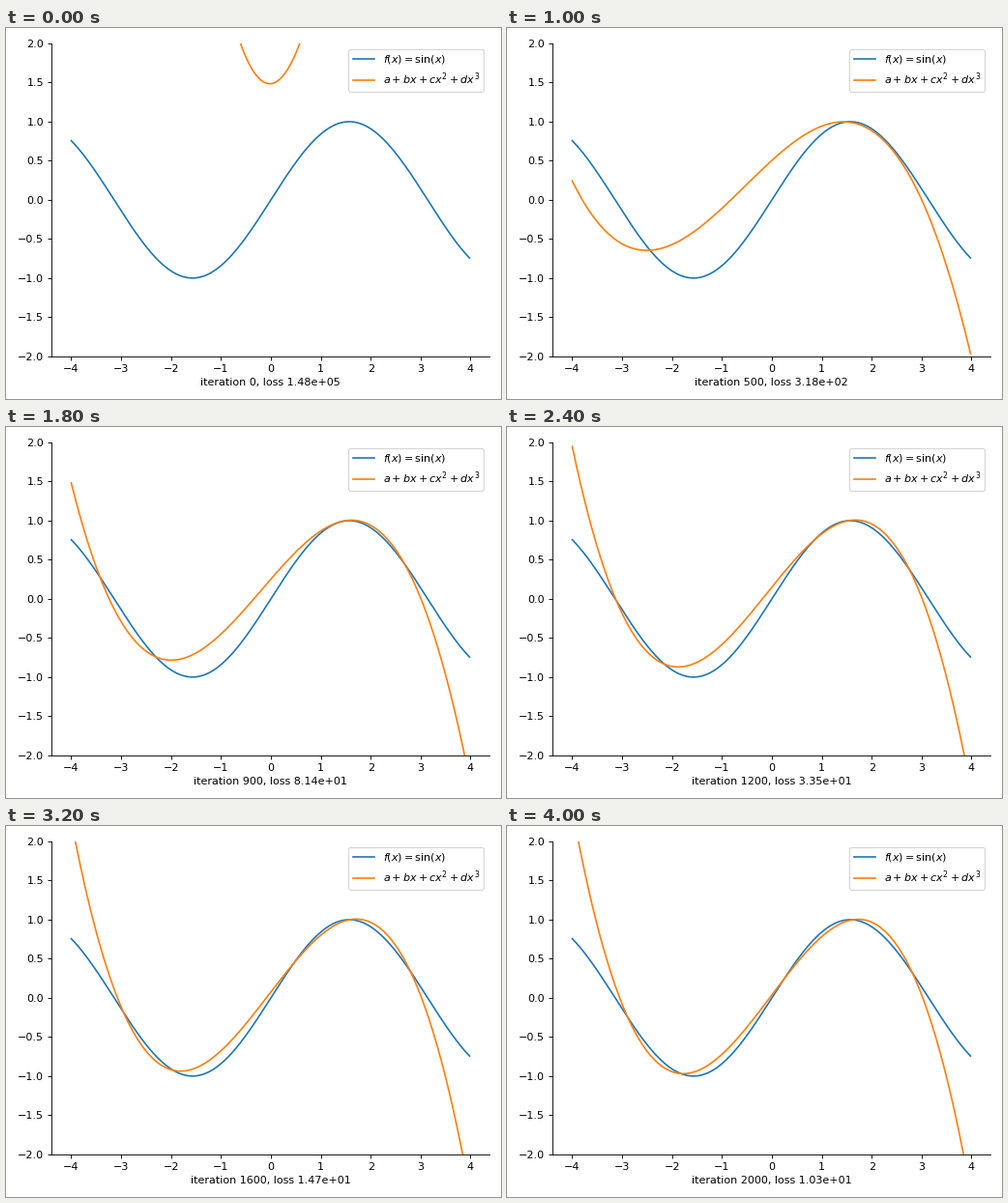
Write a matplotlib script that moves like this. It is 512x384 px and loops after 7 s.

```python
import numpy as np
import matplotlib.pyplot as plt
from matplotlib.animation import FuncAnimation

STEPS, EVERY, RATE = 2000, 100, 1e-6
FRAMES, INTERVAL = 35, 200


def fit_cubic(coef):
    """Gradient descent of a cubic on sin(x); returns (step, loss, coefficients)."""
    x = np.linspace(-np.pi, np.pi, 2000)
    powers = np.vander(x, 4, increasing=True)
    target = np.sin(x)
    log = []
    for step in range(STEPS + 1):
        error = powers @ coef - target
        coef = coef - RATE * 2 * error @ powers
        if step % EVERY == 0:
            log.append((step, error @ error, coef))
    return log


history = fit_cubic(np.array([1.51260, 0.04807, 1.60390, -0.17224]))
xs = np.arange(-4, 4, 0.02)

plt.rcParams["font.family"] = "DejaVu Sans"
fig, ax = plt.subplots(figsize=(6.4, 4.8), dpi=80)
ax.plot(xs, np.sin(xs), color="tab:blue", label=r"$f(x) = \sin(x)$")
curve, = ax.plot(xs, np.zeros_like(xs), color="tab:orange",
                 label=r"$a + bx + cx^2 + dx^3$")
ax.set_ylim(-2, 2)
ax.spines[["top", "right"]].set_visible(False)
ax.legend(loc="upper right")


def update(frame):
    step, loss, coef = history[min(frame, len(history) - 1)]
    curve.set_ydata(np.polynomial.polynomial.polyval(xs, coef))
    ax.set_xlabel(f"iteration {step}, loss {loss:.2e}")
    return curve, ax.xaxis.label


update(0)
fig.tight_layout()
anim = FuncAnimation(fig, update, frames=FRAMES, interval=INTERVAL,
                     repeat=True, repeat_delay=0)
plt.show()
```
